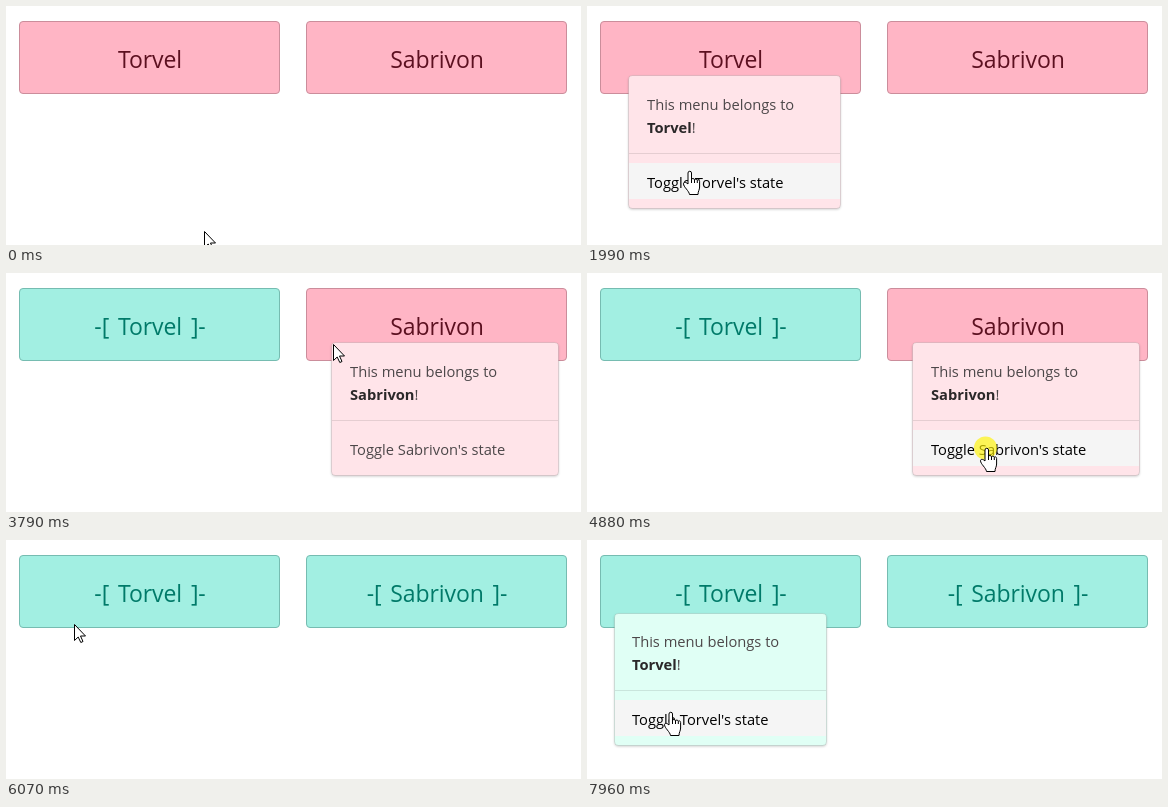
These frames come from a looping animation (575x239 px, 8 s). An HTML page:

```html
<!DOCTYPE html>
<html lang="en">
<head>
<meta charset="utf-8">
<title>Context menu demo</title>
<style>
  html, body { margin: 0; width: 100%; height: 100%; overflow: hidden; background: #fff; }
  svg { display: block; width: 575px; height: 239px; }
  text { font: 14.7px "Open Sans", "Noto Sans", sans-serif; fill: #4c4749; }
  .button rect { fill: #ffb5c5; stroke: #cb8d9b; }
  .button text { font-size: 23px; letter-spacing: -.1px; word-spacing: 3px; text-anchor: middle; fill: #5c1020; }
  .button.on rect { fill: #a2efe2; stroke: #76bcb1; }
  .button.on text { fill: #007a69; }
  .menu .panel { fill: #ffe4e9; stroke: rgba(0, 0, 0, .1); filter: drop-shadow(0 1px 1px rgba(0, 0, 0, .2)); }
  .menu.on .panel { fill: #e0fff5; }
  .menu .line { fill: rgba(0, 0, 0, .1); }
  .menu .row { fill: none; }
  .menu.hover .row { fill: #f5f5f5; }
  .menu.hover .item { fill: #000; }
  .menu .name { font-weight: 700; fill: #2b2829; }
  #click { fill: #fff200; opacity: .65; }
  #cursor path { fill: #fff; stroke: #000; stroke-linejoin: round; }
</style>
</head>
<body>
<svg viewBox="0 0 575 239">
  <g id="buttons"></g>
  <g id="menus"></g>
  <circle id="click" cx="-.5" r="11.5"/>
  <g id="cursor">
    <path id="arrow" d="M.5.5V16.5L4.2 13 6.8 18.5 9 17.5 6.5 12H11.5Z"/>
    <g id="hand">
      <path d="M-1 13V2a1.75 1.75 0 0 1 3.5 0V8.500c.3-1.400 2.800-1.300 3 .3.400-1.200 2.700-1 2.800.6.500-1 2.300-.7 2.300 1.100V16c0 3-1.600 4-1.600 7.500H.5C.2 20-5.500 16-5.500 12.700c0-1.700 2.500-1.900 4.500.3Z"/>
      <path d="M2.500 8v4M5.500 8.800v3.200M8.300 9.400v2.600"/>
    </g>
  </g>
</svg>
<script>
const LOOP = 8000;
const $ = id => document.getElementById(id);

const people = [
  { name: "Torvel", x: 13, toggled: 2150 },
  { name: "Sabrivon", x: 300, toggled: 4960 }
];

// who, top left corner, panel width, time open
const menus = [
  { who: 0, x: 41, y: 69, w: 213, from: 1030, to: 2150 },
  { who: 1, x: 325, y: 69, w: 228, from: 3790, to: 4960 },
  { who: 0, x: 26.6, y: 72.6, w: 213, from: 6780, to: LOOP }
];

const clicks = [950, 3710, 4880, 6700];

// first step, last step, number of steps, x, y, ease-out power
const moves = [
  [70, 790, 10, 43, 71],
  [1190, 1990, 11, 102, 165],
  [2530, 2840, 5, 202, 118],
  [2920, 3320, 6, 322, 73],
  [3400, 3400, 1, 327, 71],
  [4090, 4570, 7, 399, 175],
  [5190, 5990, 11, 85, 87, 1.2],
  [6070, 6070, 1, 68, 84],
  [6150, 6310, 3, 28, 74],
  [6860, 7490, 9, 74, 164],
  [7570, 7570, 1, 78, 168],
  [7810, 7960, 3, 83, 172]
];

function pointerAt(t) {
  let x = 198, y = 225;
  for (const [start, end, steps, toX, toY, power = 1] of moves) {
    if (t < start) break;
    const gap = (end - start) / (steps - 1) || 1;
    const done = Math.min(steps, Math.floor((t - start + 10) / gap) + 1);
    const p = 1 - (1 - done / steps) ** power;
    x += (toX - x) * p;
    y += (toY - y) * p;
  }
  return { x: Math.round(x), y: Math.round(y) };
}

function addGroup(parent, className, markup) {
  const g = document.createElementNS("http://www.w3.org/2000/svg", "g");
  g.setAttribute("class", className);
  g.innerHTML = markup;
  $(parent).append(g);
  return g;
}

for (const p of people) {
  p.el = addGroup("buttons", "button",
    `<rect x="${p.x + .5}" y="15.5" width="260" height="72" rx="3.5"/>
     <text x="${p.x + 131}" y="62"></text>`);
  p.label = p.el.querySelector("text");
}

for (const m of menus) {
  const { name } = people[m.who];
  // the panel snaps to the nearest pixel, its content rounds down
  const left = Math.floor(m.x), top = Math.floor(m.y);
  const dx = Math.round(m.x) - left, dy = Math.round(m.y) - top;
  m.el = addGroup("menus", "menu",
    `<rect class="panel" x="${dx + .5}" y="${dy + .5}" width="${m.w - 1}" height="${133 - dy}" rx="4"/>
     <rect class="line" x="${dx + 1}" y="78" width="${m.w - 2}" height="1"/>
     <rect class="row" x="${dx + 1}" y="88" width="${m.w - 2}" height="36"/>
     <text x="19" y="35">This menu belongs to</text>
     <text x="19" y="58"><tspan class="name">${name}</tspan>!</text>
     <text class="item" x="19" y="113">Toggle ${name}'s state</text>`);
  m.el.setAttribute("transform", `translate(${left} ${top})`);
}

const show = (el, on) => { el.style.display = on ? "" : "none"; };

function draw(t) {
  const { x, y } = pointerAt(t);
  let hovering = false;

  for (const p of people) {
    const on = t >= p.toggled;
    const label = on ? `-[ ${p.name} ]-` : p.name;
    p.el.classList.toggle("on", on);
    if (p.label.textContent !== label) p.label.textContent = label;
  }

  for (const m of menus) {
    const open = t >= m.from && t < m.to;
    const hover = open && y >= m.y + 88 && y < m.y + 124;
    show(m.el, open);
    m.el.classList.toggle("hover", hover);
    m.el.classList.toggle("on", t >= people[m.who].toggled);
    hovering ||= hover;
  }

  const place = `translate(${x} ${y})`;
  $("cursor").setAttribute("transform", place);
  $("click").setAttribute("transform", place);
  show($("click"), clicks.some(c => t >= c && t < c + 80));
  show($("arrow"), !hovering);
  show($("hand"), hovering);
}

const began = performance.now();
function tick() {
  draw((performance.now() - began) % LOOP);
  requestAnimationFrame(tick);
}
tick();
</script>
</body>
</html>
```
